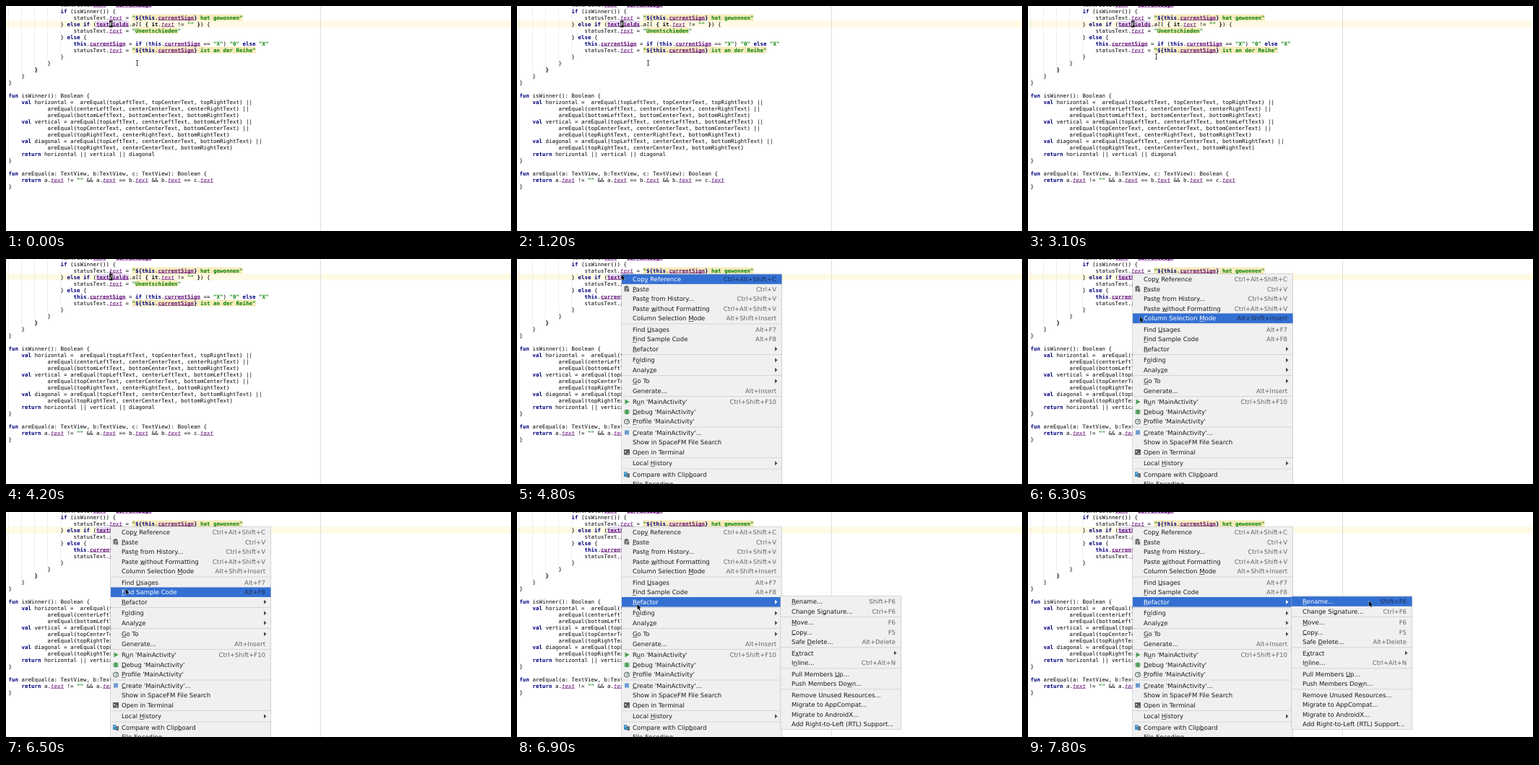
Animation of 699 by 312 pixels, one loop 8 s. Source, as an HTML page with a canvas:

```html
<!DOCTYPE html>
<html lang="de">
<head>
<meta charset="utf-8">
<title>Editor context menu</title>
<style>
html, body { margin: 0; width: 100%; height: 100%; overflow: hidden; background: #fff; }
canvas { display: block; }
</style>
</head>
<body>
<canvas id="stage" width="699" height="312"></canvas>
<script>
const ctx = document.getElementById('stage').getContext('2d');
const LOOP = 8000, STEP = 100;
const CODE_X = 3.5, CHAR = 4.5, LINE = 9, CARET_COL = 31, CARET_TOP = 20.5;
const MONO = '7.475px "DejaVu Sans Mono", monospace';
const SANS = '8.5px "DejaVu Sans", sans-serif';
const NAVY = '#000080', PURPLE = '#660e7a', GREEN = '#008000';
const BLUE = '#3470d2', ROW = 13.55, GAP = 1.9;

const code = `                textField.text = currentSign
                if (isWinner()) {
                    statusText.text = "\${this.currentSign} hat gewonnen"
                } else if (textFields.all { it.text != "" }) {
                    statusText.text = "Unentschieden"
                } else {
                    this.currentSign = if (this.currentSign == "X") "0" else "X"
                    statusText.text = "\${this.currentSign} ist an der Reihe"
                }
            }
        }
    }
}

fun isWinner(): Boolean {
    val horizontal =  areEqual(topLeftText, topCenterText, topRightText) ||
            areEqual(centerLeftText, centerCenterText, centerRightText) ||
            areEqual(bottomLeftText, bottomCenterText, bottomRightText)
    val vertical = areEqual(topLeftText, centerLeftText, bottomLeftText) ||
            areEqual(topCenterText, centerCenterText, bottomCenterText) ||
            areEqual(topRightText, centerRightText, bottomRightText)
    val diagonal = areEqual(topLeftText, centerCenterText, bottomRightText) ||
            areEqual(topRightText, centerCenterText, bottomRightText)
    return horizontal || vertical || diagonal
}

fun areEqual(a: TextView, b:TextView, c: TextView): Boolean {
    return a.text != "" && a.text == b.text && b.text == c.text
}`.split('\n');

// First matching rule styles a token: [pattern, font style, colour, underline]
const rules = [
  [/"(?=\$)|"[^"$]*"|(?<=Sign\}) .*"/, 'bold', GREEN],
  [/\$\{|(?<=Sign)\}|\b(?:if|else|this|val|fun|return)\b/, 'bold', NAVY],
  [/\b(?:currentSign|textFields)\b/, 'bold', PURPLE, true],
  [/\btext\b/, 'italic', PURPLE, true],
  [/\ball\b/, 'italic', '#000'],
  [/\{(?= it)|\bit\b|(?<="" )\}|^ {8}\}/, 'bold', '#000'],
  [/./, '', '#000']
];
const lexer = new RegExp(rules.map(r => `(${r[0].source})`).join('|'), 'g');

// "&" marks the mnemonic, "|" the shortcut, ">" a submenu, "-" a separator
const mainMenu = layout(145, 221.5, 28, 312, [
  'Cop&y Reference|Ctrl+Alt+Shift+C', '&Paste|Ctrl+V', 'Past&e from History...|Ctrl+Shift+V',
  'Paste &without Formatting|Ctrl+Alt+Shift+V', 'Column Selection &Mode|Alt+Shift+Insert', '-',
  'Find &Usages|Alt+F7', '&Find Sample Code|Alt+F8', '&Refactor|>', '-',
  'F&olding|>', 'Analy&ze|>', '-', '&Go To|>', 'Generate...|Alt+Insert', '-',
  "R&un 'MainActivity'|Ctrl+Shift+F10", "&Debug 'MainActivity'", "&Profile 'MainActivity'", '-',
  "&Create 'MainActivity'...", 'Show in SpaceFM File Search', 'Open in Terminal', '-',
  'Local &History|>', '-', 'Compare with Clip&board', 'File Encoding'
]);
const subMenu = layout(365, 166.5, 124, 301, [
  '&Rename...|Shift+F6', 'Change Si&gnature...|Ctrl+F6', '-',
  '&Move...|F6', '&Copy...|F5', 'Safe &Delete...|Alt+Delete', '-',
  'E&xtract|>', 'I&nline...|Ctrl+Alt+N', '-',
  'Pull Members &Up...', 'Push Members Do&wn...', '-',
  'Remove Unused Resources...', 'Migrate to AppCompat...', 'Migrate to AndroidX...',
  'Add Right-to-Left (RTL) Support...'
]);

const blinks = [600, 1200, 1600, 2000, 2500, 3100, 3600, 4000, 4600];
const path = [
  [0, 181.5, 79], [1900, 181.5, 79], [2000, 181.5, 78], [2100, 181.5, 78], [2200, 181, 76],
  [3000, 181, 76], [3100, 177.5, 70], [3500, 156, 41], [3900, 144, 24], [4000, 144, 23],
  [4100, 144, 23], [4200, 144.5, 21.5], [5600, 144.5, 21.5], [5700, 145, 27], [5900, 147, 38.5],
  [6100, 152, 66], [6200, 152, 66], [6300, 155, 80], [6500, 165.5, 106.5], [6700, 166.5, 128],
  [7200, 166.5, 128], [7300, 185, 127], [7400, 250, 126], [7600, 410, 124.5],
  [7700, 460, 123.5], [7800, 472, 123.5], [LOOP, 472, 123.5]
];

function layout(x, w, y, bottom, list) {
  const items = [], rules = [];
  for (const text of list) {
    if (text === '-') {
      rules.push(y - ROW / 2 + GAP / 2);
      y += GAP;
    } else {
      const [label, key] = text.split('|');
      items.push({ label, key, y });
      y += ROW;
    }
  }
  return { x, w, top: items[0].y - 7, bottom, items, rules };
}

function rect(x, y, w, h, color) {
  ctx.fillStyle = color;
  ctx.fillRect(x, y, w, h);
}

function shape(points, color, outline) {
  ctx.beginPath();
  points.forEach(([x, y]) => ctx.lineTo(x, y));
  ctx.closePath();
  if (outline) {
    ctx.strokeStyle = outline;
    ctx.lineWidth = 1;
    ctx.stroke();
  }
  ctx.fillStyle = color;
  ctx.fill();
}

function disc(x, y, rx, ry, color) {
  ctx.beginPath();
  ctx.ellipse(x, y, rx, ry, 0, 0, 7);
  ctx.fillStyle = color;
  ctx.fill();
}

const colX = col => CODE_X + col * CHAR;

function drawCode(caretOn) {
  rect(0, 0, 699, 312, '#fff');
  rect(0, CARET_TOP, 699, LINE, '#fffae3');
  rect(435, 0, 1, 312, '#dedede');
  [[0, 102], [4, 93], [8, 84], [12, 75], [16, 2]].forEach(([c, h]) => rect(colX(c), 0, .5, h, '#dcdcdc'));
  [0, 4].forEach(c => c || rect(colX(c), 129, .5, 81, '#dcdcdc'));
  rect(colX(0), 237, .5, 9, '#dcdcdc');
  rect(colX(16), 12, .5, 9, '#dcdcdc');
  rect(colX(16), 30, .5, 9, '#dcdcdc');
  rect(colX(16), 48, .5, 18, '#dcdcdc');
  [[38, 2, 34], [39, 4, 13], [38, 7, 38]].forEach(([c, line, n]) =>
    rect(colX(c), line * LINE - 6.5, n * CHAR, LINE, '#f6ebbc'));
  rect(colX(27), CARET_TOP, 10 * CHAR, LINE, '#e4dcf0');

  code.forEach((text, i) => {
    const y = .5 + i * LINE;
    for (const m of text.matchAll(lexer)) {
      const [, style, color, underline] = rules[m.slice(1).findIndex(g => g !== undefined)];
      ctx.font = `${style} ${MONO}`;
      ctx.fillStyle = color;
      [...m[0]].forEach((c, k) => ctx.fillText(c, colX(m.index + k), y));
      if (underline) rect(colX(m.index), y + .8, m[0].length * CHAR, .6, color);
    }
  });

  if (caretOn) {
    rect(colX(CARET_COL), CARET_TOP, CHAR, LINE, '#000');
    ctx.font = `bold ${MONO}`;
    ctx.fillStyle = '#fff';
    ctx.fillText('F', colX(CARET_COL), 27.5);
  }
}

function drawMenu({ x, w, top, bottom, items, rules }, active) {
  rect(x - .5, top - .5, w + 1, bottom - top + 1, '#b4b4b4');
  rect(x, top, w, bottom - top, '#f0f0f0');
  rules.forEach(y => rect(x, y - .4, w, .8, '#cfcfcf'));
  ctx.font = SANS;
  for (const item of items) {
    const { label, key, y } = item, on = item === active, ink = on ? '#fff' : '#1a1a1a';
    if (on) rect(x, y - ROW / 2, w, ROW, BLUE);
    const at = label.indexOf('&'), text = label.replace('&', ''), base = y + 3;
    ctx.fillStyle = ink;
    ctx.fillText(text, x + 15, base);
    if (at >= 0) {
      const left = ctx.measureText(text.slice(0, at)).width;
      rect(x + 15 + left, base + .8, ctx.measureText(text[at]).width, .6, ink);
    }
    if (key === '>') {
      const ax = x + w - 9.5;
      shape([[ax, y - 3], [ax + 3.5, y], [ax, y + 3]], on ? '#fff' : '#4a4a4a');
    } else if (key) {
      ctx.fillStyle = on ? '#1d2f58' : '#666';
      ctx.textAlign = 'right';
      ctx.fillText(key, x + w - 7.5, base);
      ctx.textAlign = 'left';
    }
  }
}

function drawIcons() {
  const green = '#4d9e58', grey = '#6e6e6e', x = 152;
  // Paste
  rect(x - 3.5, 38, 6, 7, grey);
  rect(x - 2, 37, 3, 1.5, grey);
  rect(x - 1, 40.5, 4.5, 5, '#f0f0f0');
  rect(x - .3, 41, 3.5, 4.3, grey);
  // Run, debug, profile
  shape([[149.5, 194.5], [155.5, 198], [149.5, 201.5]], green);
  disc(x, 212, 2.5, 3.5, green);
  [-2, 0, 2].forEach(d => rect(x - 4, 211.6 + d, 8, .8, green));
  disc(x, 225.5, 4, 3.8, grey);
  disc(x, 225.5, 2.8, 2.6, '#f0f0f0');
  shape([[151, 226], [155, 222], [152.5, 227]], green);
  // Create
  rect(x - 3, 237.5, 6, 6, '#6b9bd2');
  // Terminal
  rect(x - 4, 264, 8, 7.5, '#5a5a5a');
  shape([[149.5, 265.5], [151.5, 267.2], [149.5, 269]], '#f0f0f0');
  rect(152, 269, 2.5, .8, '#f0f0f0');
  // Compare
  rect(x - 4, 295, 4.5, 7, '#3d8fc4');
  rect(x - 3, 296.5, 2.5, .8, '#f0f0f0');
  rect(x, 297, 4, 6, grey);
  shape([[151, 298], [154, 300], [151, 302]], '#3d8fc4');
}

function mouseAt(t) {
  const i = path.findIndex(p => p[0] > t);
  const [t0, x0, y0] = path[i - 1], [t1, x1, y1] = path[i];
  const k = (t - t0) / (t1 - t0);
  return [x0 + (x1 - x0) * k, y0 + (y1 - y0) * k];
}

function drawBeam(x, y) {
  rect(x - .4, y - 3.5, .9, 7, '#333');
  rect(x - 1.5, y - 4, 3, .8, '#333');
  rect(x - 1.5, y + 3.2, 3, .8, '#333');
}

function drawArrow(x, y) {
  const outline = [[0, 0], [0, 7.2], [1.6, 5.8], [2.8, 8.4], [4, 7.8], [2.9, 5.3], [5, 5.2]];
  shape(outline.map(([dx, dy]) => [x + dx, y + dy]), '#000', 'rgba(255,255,255,.6)');
}

function draw(t) {
  const [x, y] = mouseAt(t);
  drawCode(blinks.filter(b => b <= t).length % 2 === 0);
  if (t < 4800) return drawBeam(x, y);
  drawMenu(mainMenu, mainMenu.items.findLast(item => item.y - ROW / 2 <= y));
  drawIcons();
  if (t >= 6900) drawMenu(subMenu, x > subMenu.x && subMenu.items[0]);
  drawArrow(x, y);
}

ctx.textRendering = 'geometricPrecision';
let last = -1;
function tick() {
  const t = Math.floor(performance.now() % LOOP / STEP) * STEP;
  if (t !== last) draw(last = t);
  requestAnimationFrame(tick);
}
tick();
</script>
</body>
</html>
```
